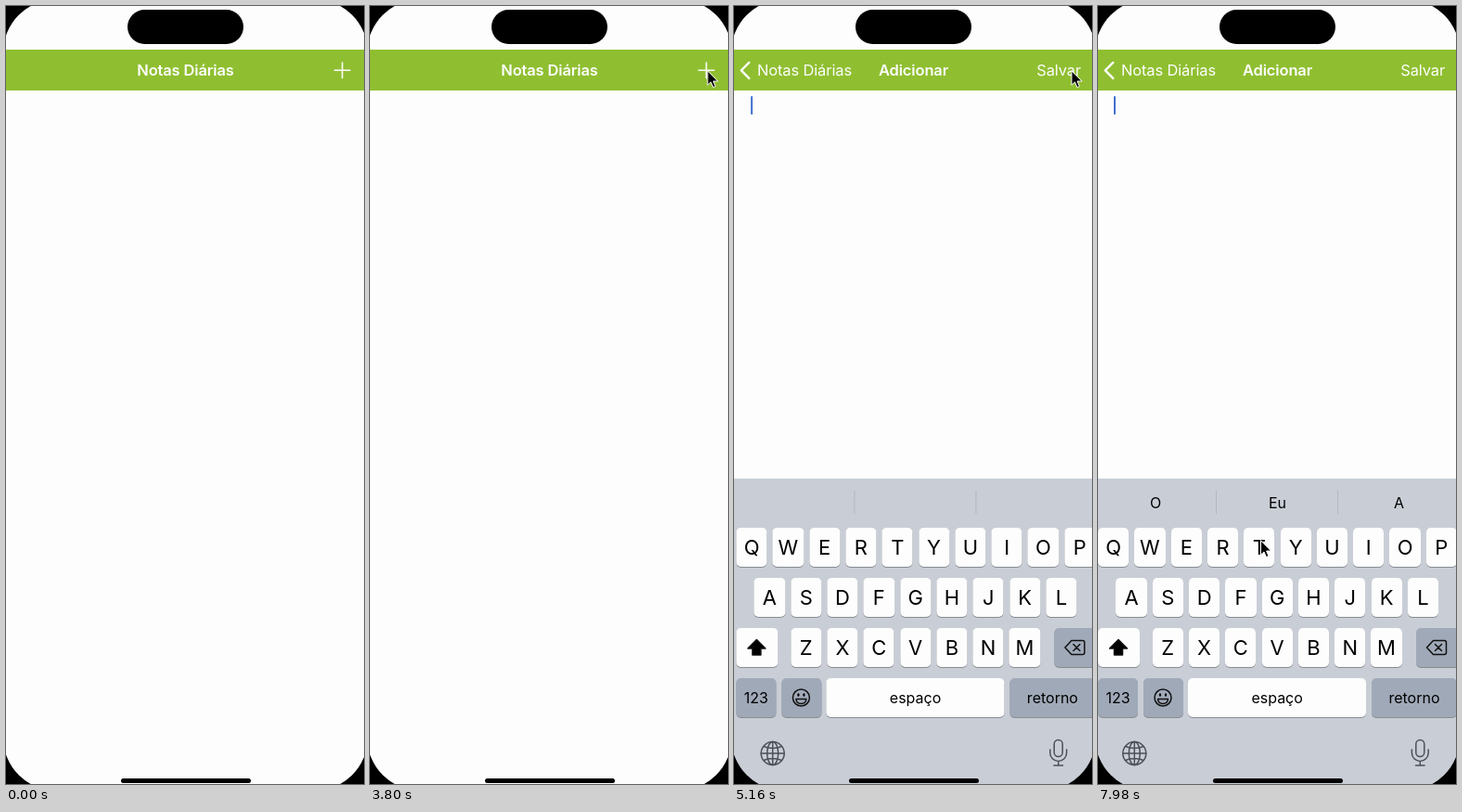
An HTML page that plays this animation: 386 by 838 pixels, repeating every 8 s.

```html
<!DOCTYPE html>
<html lang="pt">
<head>
<meta charset="utf-8">
<title>Notas</title>
<style>
  html, body { margin: 0; width: 100%; height: 100%; overflow: hidden; }
  #stage {
    position: relative; width: 386px; height: 838px; overflow: hidden;
    background: #fdfdfd; color: #000;
    font: 400 16.5px/20px Inter, "Liberation Sans", sans-serif;
  }
  #stage div, #stage svg { position: absolute; box-sizing: border-box; }
  svg { left: 0; top: 0; overflow: visible; fill: none; stroke-linecap: round; stroke-linejoin: round; }
  #dim { inset: 0; background: #dedede; }
  #page { left: -3px; top: 0; width: 396px; height: 838px; background: #fdfdfd; }
  #caret { left: 19.5px; top: 97px; width: 2px; height: 20px; border-radius: 1px; background: #416fcb; }
  #bar { left: 0; top: 46.5px; width: 386px; height: 44px; background: #8fbf30; }
  #bar, #time { color: #fdfdfd; letter-spacing: -.15px; white-space: nowrap; }
  #bar svg { stroke: #fdfdfd; }
  #bar .layer { inset: 0; }
  .label { top: 12.5px; }
  .title { left: 0; width: 387px; text-align: center; font-weight: 600; }
  #time { left: 30px; top: 12px; width: 80px; text-align: center; font-weight: 600; }
  #keys { left: 0; top: 509px; width: 390px; height: 329px; }
  #keys .back { left: -3px; top: 0; width: 396px; height: 329px; background: #c9ced6; }
  .key {
    height: 42px; border-radius: 5px; background: #fdfdfd;
    box-shadow: 0 1px 0 #898c92; text-align: center; line-height: 42px; font-size: 16px;
  }
  .key.letter { width: 33.3px; font-size: 22px; line-height: 43px; }
  .key.grey { background: #a0a9b8; }
  .split { top: 13px; width: 1px; height: 25px; background: #b2b7c0; }
  .hint { top: 16px; width: 100px; text-align: center; font-size: 16px; }
  #island { left: 131px; top: 4px; width: 125px; height: 37px; border-radius: 19px; background: #000; }
  #home { left: 124px; top: 832px; width: 140px; height: 5px; border-radius: 3px; background: #000; }
  #frame { left: -3.5px; top: -7px; width: 393px; height: 852px; border-radius: 57px; box-shadow: 0 0 0 60px #000; }
</style>
</head>
<body>
<div id="stage">
  <div id="dim"></div>
  <div id="time">23:53</div>
  <div id="page"><div id="caret"></div></div>

  <div id="keys">
    <div class="back"></div>
    <div class="split" style="left:127px"></div>
    <div class="split" style="left:258px"></div>
    <div id="hints"></div>
  </div>

  <div id="bar">
    <div class="layer" id="oldBar">
      <div class="label title">Notas Diárias</div>
      <svg id="plus" width="386" height="44" stroke-width="1.6"><path d="M354.3 22.3h16.6M362.6 14v16.6"/></svg>
    </div>
    <div class="layer" id="newBar">
      <svg width="386" height="44" stroke-width="2.4"><path d="M16.3 13.9L7.8 22.4l8.5 8.5"/></svg>
      <div class="label" style="left:25px">Notas Diárias</div>
      <div class="label title">Adicionar</div>
      <div class="label" style="right:12px">Salvar</div>
    </div>
  </div>

  <div id="island"></div>
  <div id="home"></div>
  <svg id="cursor" width="12" height="19">
    <path d="M0 0V15.2L3.5 11.9 6 17.6 8.5 16.5 6.1 11H10.8Z" fill="#000" stroke="#fff" stroke-width="1"/>
  </svg>
  <div id="frame"></div>
</div>

<script>
const LOOP = 8000;
const $ = id => document.getElementById(id);
const keys = $('keys');

function addKey(text, x, y, width, kind) {
  const el = document.createElement('div');
  el.className = 'key ' + kind;
  el.textContent = text;
  el.style.left = x + 'px';
  el.style.top = y + 'px';
  if (width) el.style.width = width + 'px';
  keys.append(el);
}

[['QWERTYUIOP', 0, 53], ['ASDFGHJKL', 19.4, 107], ['ZXCVBNM', 58.6, 161]].forEach(([row, x, y]) =>
  [...row].forEach((c, i) => addKey(c, x + i * 39.3, y, 0, 'letter')));
addKey('', 0, 161, 44.5, '');
addKey('', 342.6, 161, 47, 'grey');
addKey('123', 0, 215, 43, 'grey');
addKey('', 48.6, 215, 43.4, 'grey');
addKey('espaço', 97.3, 215, 191.7, '');
addKey('retorno', 295, 215, 92, 'grey');

[['O', 62], ['Eu', 193.5], ['A', 324.5]].forEach(([word, x]) => {
  const el = document.createElement('div');
  el.className = 'hint';
  el.textContent = word;
  el.style.left = x - 50 + 'px';
  $('hints').append(el);
});

keys.insertAdjacentHTML('beforeend', `
<svg width="390" height="329" stroke="#111" stroke-width="1.5">
  <path fill="#000" d="M22 173.5L31.5 183H26.5V190H17.5V183H12.5Z"/>
  <path d="M361.5 174.5H373.5Q375.5 174.5 375.5 176.5V187.5Q375.5 189.5 373.5 189.5H361.5L354.5 182ZM363.5 178.5l7 7M370.5 178.5l-7 7"/>
  <circle cx="70" cy="236" r="9"/>
  <path d="M64.5 237.5H75.5Q75 242.5 70 242.5T64.5 237.5Z"/>
  <ellipse cx="67" cy="233" rx="1.2" ry="1.8" fill="#000" stroke="none"/>
  <ellipse cx="73" cy="233" rx="1.2" ry="1.8" fill="#000" stroke="none"/>
  <g stroke="#4c5058" stroke-width="1.5">
    <circle cx="39.3" cy="296" r="12.5"/>
    <ellipse cx="39.3" cy="296" rx="6" ry="12.5"/>
    <path d="M39.3 283.5v25M26.8 296h25M29.5 288.5q9.8 4 19.6 0M29.5 303.5q9.8-4 19.6 0"/>
    <rect x="342.8" y="281.5" width="9" height="18" rx="4.5"/>
    <path d="M338.4 292v3.5a8.9 8.9 0 0 0 17.8 0V292M347.3 304.5v4.5M342.5 309h9.6"/>
  </g>
</svg>`);

const PAGE_START = 3957, KEYS_START = 4087;

// Critically damped spring: 1 at start, settling to 0.
function spring(t, start) {
  const s = Math.max(0, t - start) * 0.0067;
  return (1 + s) * Math.exp(-s);
}

// Pointer stops: time, x, y
const path = [
  [1400, 384, 420], [2080, 371, 77], [2220, 371, 77], [2480, 364, 70],
  [5260, 364, 70], [6000, 240, 404], [6140, 240, 404], [7300, 178, 570], [7960, 175.5, 576], [LOOP, 175.5, 576]
];

function pointer(t) {
  const i = path.findIndex(p => p[0] > t);
  const [t0, x0, y0] = path[i - 1], [t1, x1, y1] = path[i];
  const u = (t - t0) / (t1 - t0), e = u * u * (3 - 2 * u);
  return [x0 + (x1 - x0) * e, y0 + (y1 - y0) * e];
}

// The picture rests for 100 ms in every 840 ms once the page opens.
function withRests(t) {
  const phase = (t - 3380) % 840;
  return t >= 4220 && phase < 100 ? t - phase : t;
}

function caretOn(t) {
  return t < 5670 || (t - 5670) % 1200 >= 600;
}

function draw(t) {
  const left = spring(t, PAGE_START);
  const settled = 1 - left;
  $('page').style.transform = `translateX(${left * 393}px)`;
  $('page').style.visibility = t < PAGE_START ? 'hidden' : 'visible';
  $('dim').style.opacity = settled;
  $('oldBar').style.opacity = left;
  $('newBar').style.opacity = settled;
  $('plus').style.opacity = t >= 3200 && t < 3500 ? 0.4 : 1;
  $('caret').style.opacity = caretOn(t) ? 1 : 0;

  keys.style.transform = `translateX(${spring(t, KEYS_START) * 393}px)`;
  keys.style.visibility = t < KEYS_START ? 'hidden' : 'visible';
  $('hints').style.opacity = t < 5500 ? 0 : 1;

  const shown = t >= 1400;
  $('cursor').style.display = shown ? 'block' : 'none';
  if (shown) {
    const [x, y] = pointer(t);
    $('cursor').style.transform = `translate(${x}px, ${y}px)`;
  }
}

const begin = performance.now();
function tick() {
  draw(withRests((performance.now() - begin) % LOOP));
  requestAnimationFrame(tick);
}
tick();
</script>
</body>
</html>
```
